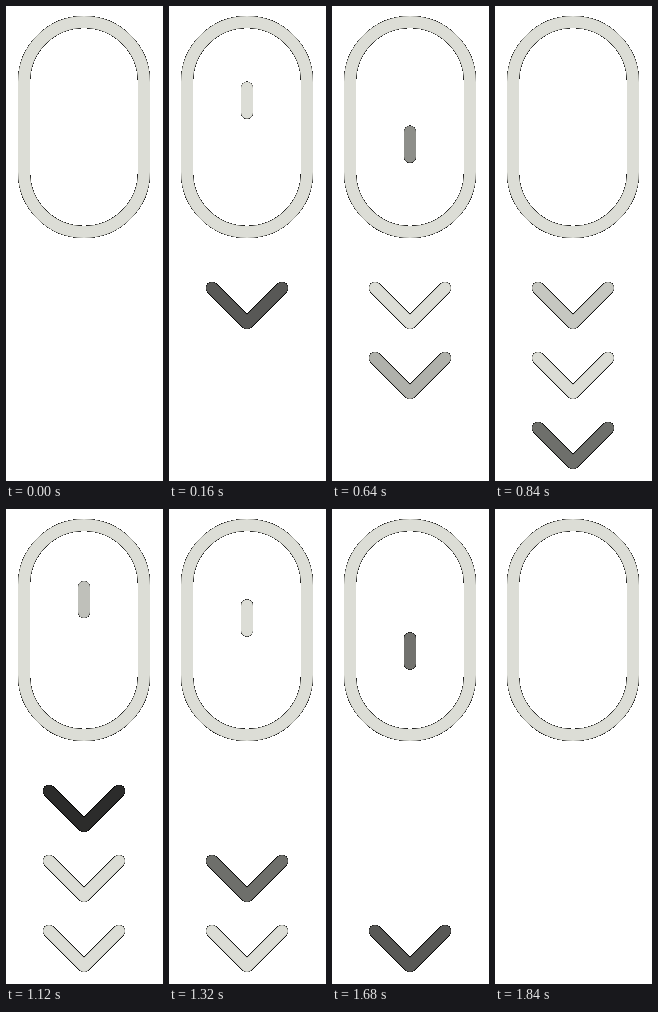
An HTML page that plays this animation: 157 px wide and 475 px high, repeating every 1880 ms.

```html
<!DOCTYPE html>
<html lang="en">
<head>
<meta charset="utf-8">
<title>Scroll hint</title>
<style>
  html, body { margin: 0; width: 100%; height: 100%; overflow: hidden; background: #fff; }
  svg { display: block; }
  svg * { fill: none; stroke-width: 12; stroke-linecap: round; stroke-linejoin: round; }
  .edge { stroke: #000; stroke-width: 12.8; shape-rendering: crispEdges; }
</style>
</head>
<body>
<svg id="stage" width="157" height="475" viewBox="0 0 157 475"></svg>
<script>
const LOOP = 1880, STEP = 40, WHEEL_PERIOD = 1000;
const BASE = [220, 221, 214];
const stage = document.getElementById('stage');

const clamp = v => Math.max(0, Math.min(1, v));
const fade = (t, inStart, inEnd, outStart, outEnd) =>
  Math.min(clamp((t - inStart) / (inEnd - inStart)), clamp((outEnd - t) / (outEnd - outStart)));

function make(parent, tag, attrs) {
  const el = document.createElementNS('http://www.w3.org/2000/svg', tag);
  for (const name in attrs) el.setAttribute(name, attrs[name]);
  return parent.appendChild(el);
}

// A light stroke over a crisp black edge; it fades towards black, then vanishes.
function makePart(tag, attrs) {
  const group = make(stage, 'g', {});
  make(group, '${tag}'.length ? tag : tag, { ...attrs, class: 'edge' });
  const face = make(group, tag, attrs);
  return (level, y = 0) => {
    group.setAttribute('visibility', level > 0.02 ? 'visible' : 'hidden');
    group.setAttribute('transform', `translate(0 ${y})`);
    face.setAttribute('stroke', `rgb(${BASE.map(c => Math.round(c * level))})`);
  };
}

const body = makePart('rect', { x: 18, y: 16, width: 120, height: 210, rx: 60 });
const wheel = makePart('path', { d: 'M78 6V31' });
const chevrons = [0, 1, 2].map(() => makePart('path', { d: 'M43 282L78 317L113 282' }));

// A quick start, then a steady glide.
const wheelTop = t => t < 120 ? 55.3 + 0.14 * t : 72.1 + 0.0917 * (t - 120);

function draw(t) {
  const phase = t % WHEEL_PERIOD;
  wheel(fade(phase, 0, 138, 530, 840), wheelTop(phase));
  chevrons.forEach((chevron, i) =>
    chevron(fade(t - 320 * i, 0, 400, 800, 1200), 70 * i));
}

body(1);
const start = performance.now();
function tick() {
  const t = (performance.now() - start) % LOOP;
  draw(Math.floor(t / STEP) * STEP);
  requestAnimationFrame(tick);
}
tick();
</script>
</body>
</html>
```
